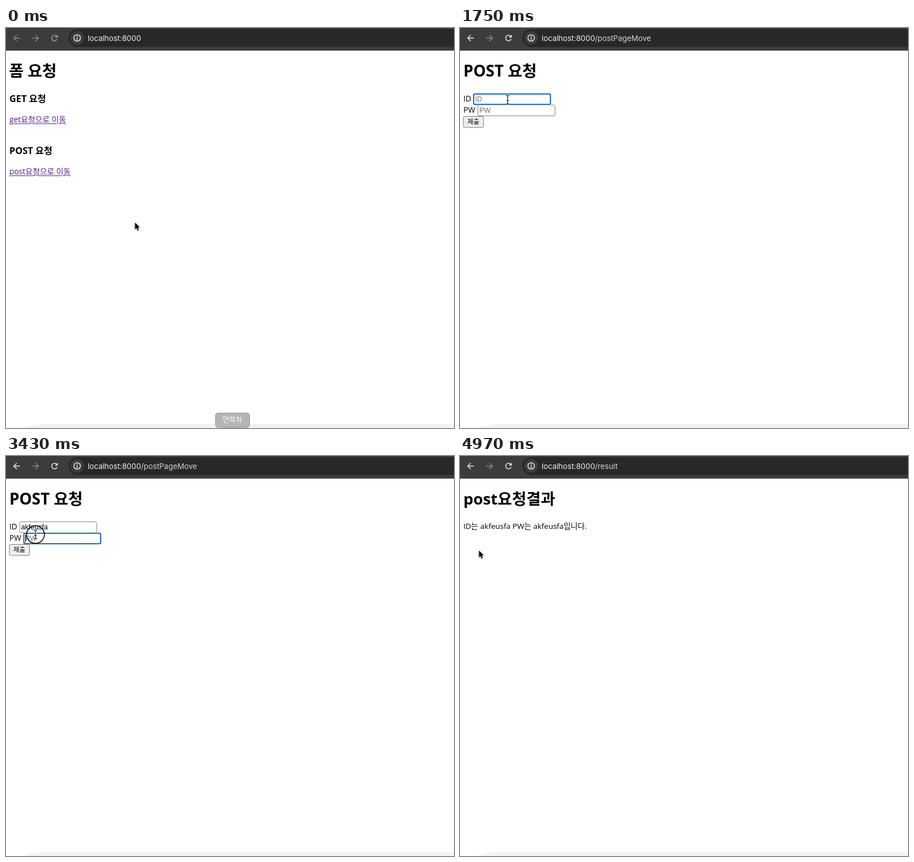
Write an HTML page with a canvas that moves like this. It is 790 px wide and 708 px high and loops after 5.32 s.

```html
<!DOCTYPE html>
<html lang="ko">
<head>
<meta charset="utf-8">
<title>폼 요청</title>
<style>
html, body { margin: 0; width: 100%; height: 100%; overflow: hidden; background: #fff; }
canvas { display: block; }
</style>
</head>
<body>
<canvas id="stage" width="790" height="708"></canvas>
<script>
const LOOP = 5320, STEP = 70;
const ctx = document.getElementById('stage').getContext('2d');
const PAGE = '"Open Sans", "Noto Sans CJK KR", "Noto Sans CJK", sans-serif';
const FIELD = '"Liberation Sans", "Noto Sans CJK KR", sans-serif';
const UI = 'Inter, "Noto Sans CJK KR", sans-serif';
const USER = 'akfeusfa';
const SAVED = [USER, 'test', 'hello', 'qwerty', '1234'];

// Pointer path: time, x, y
const PATH = [
  [0, 227, 344], [350, 227, 344], [700, 109, 270], [840, 93, 251],
  [1260, 93, 251], [1680, 84, 127], [2870, 84, 127], [3150, 52, 139],
  [4270, 52, 139], [4480, 33, 167], [LOOP, 33, 167]
];
const ID_KEYS = [2100, 2310, 2380, 2520, 2590, 2660, 2730, 2800];
const PW_KEYS = [3640, 3710, 3780, 3850, 3990, 4060, 4060, 4130];
const CLICKS = [910, 1820, 3430, 4620];

const within = (t, a, b) => t >= a && t < b;
const typed = (keys, t) => keys.filter(k => k <= t).length;

function pointerAt(t) {
  let i = 1;
  while (i < PATH.length - 1 && PATH[i][0] < t) i++;
  const [ta, xa, ya] = PATH[i - 1], [tb, xb, yb] = PATH[i];
  const p = (t - ta) / (tb - ta);
  return [xa + (xb - xa) * p, ya + (yb - ya) * p];
}

function text(s, x, y, size, color = '#000', family = PAGE, weight = 400) {
  ctx.font = `${weight} ${size}px ${family}`;
  ctx.fillStyle = color;
  ctx.fillText(s, x, y);
  return ctx.measureText(s).width;
}

function box(x, y, w, h, r, fill, stroke, line = 1) {
  ctx.beginPath();
  ctx.roundRect(x, y, w, h, r);
  if (fill) { ctx.fillStyle = fill; ctx.fill(); }
  if (stroke) { ctx.strokeStyle = stroke; ctx.lineWidth = line; ctx.stroke(); }
}

function circle(x, y, r, fill, stroke, line) {
  box(x - r, y - r, 2 * r, 2 * r, r, fill, stroke, line);
}

function lines(points, color, width) {
  ctx.beginPath();
  points.forEach(([x, y], i) => i ? ctx.lineTo(x, y) : ctx.moveTo(x, y));
  ctx.strokeStyle = color;
  ctx.lineWidth = width;
  ctx.stroke();
}

function arrowIcon(x, y, dir, color) {
  lines([[x - dir * 5.5, y], [x + dir * 5, y]], color, 1.6);
  lines([[x, y - 5.3], [x + dir * 5.3, y], [x, y + 5.3]], color, 1.6);
}

function reloadIcon(x, y, color) {
  ctx.beginPath();
  ctx.arc(x, y, 4.9, 0.35, 5.5);
  ctx.strokeStyle = color;
  ctx.lineWidth = 1.6;
  ctx.stroke();
  ctx.beginPath();
  ctx.moveTo(x + 5.8, y - 6);
  ctx.lineTo(x + 5.8, y - 0.8);
  ctx.lineTo(x + 0.6, y - 0.8);
  ctx.fillStyle = color;
  ctx.fill();
}

function toolbar(t) {
  const lit = '#e0e0e0', dim = '#858585';
  ctx.fillStyle = '#3c3c3c';
  ctx.fillRect(0, 0, 790, 40);
  box(110, 2, 720, 31.5, 15.75, '#282828');
  arrowIcon(19, 17.8, -1, t >= 1050 ? lit : dim);
  arrowIcon(52, 17.8, 1, within(t, 210, 1050) ? lit : dim);
  reloadIcon(85.5, 17.8, t >= 210 ? lit : '#999');
  circle(125.5, 17.6, 12, '#3d3d3d');
  circle(125.5, 17.6, 5.7, null, '#eee', 1.5);
  ctx.fillStyle = '#eee';
  ctx.fillRect(124.7, 16.8, 1.6, 4);
  ctx.fillRect(124.7, 14.2, 1.6, 1.6);
  const host = text('localhost:8000', 144, 22.5, 13.3, '#f0f0f0', UI);
  const path = t >= 4900 ? '/result' : t >= 980 ? '/postPageMove' : '';
  text(path, 144 + host, 22.5, 13.3, '#d2d2d2', UI);
}

function link(s, y, color) {
  ctx.font = `13.8px ${PAGE}`;
  const w = ctx.measureText(s).width;
  ctx.fillStyle = color;
  ctx.fillRect(6, y + 2, w, 1);
  ctx.strokeStyle = '#fff';
  ctx.lineWidth = 2;
  ctx.strokeText(s, 6, y);
  text(s, 6, y, 13.8, color);
}

function homePage(t) {
  const visited = '#551a8b';
  text('폼 요청', 5.5, 86, 27.8, '#000', PAGE, 700);
  text('GET 요청', 6, 131, 16.3, '#000', PAGE, 700);
  link('get요청으로 이동', 167, visited);
  text('POST 요청', 6, 223, 16.3, '#000', PAGE, 700);
  link('post요청으로 이동', 259, t >= 910 ? '#f00' : visited);
}

function field(x, y, value, hint, focused, caret) {
  if (focused) {
    box(x - 1, y - 1, 138.5, 22, 4, '#fff');
    box(x + 0.5, y + 0.7, 135.5, 18.6, 2.5, '#fff', '#1d5fa8', 2);
  } else {
    box(x + 0.5, y + 0.5, 136, 19, 2, '#fff', '#808080');
  }
  const w = value ? text(value, x + 3, y + 14, 12.5, '#000', FIELD) : 0;
  if (!value) text(hint, x + 3, y + 14, 12.5, '#757575', FIELD);
  if (caret) {
    ctx.fillStyle = '#000';
    ctx.fillRect(Math.round(x + 3 + w), y + 3, 1, 14);
  }
}

function popup(x, y, w, rows, draw) {
  ctx.save();
  ctx.shadowColor = 'rgba(0,0,0,.45)';
  ctx.shadowBlur = 3;
  ctx.shadowOffsetY = 1;
  box(x, y, w, 41 + (rows - 1) * 41.6, 3, '#1f1f1f');
  ctx.restore();
  ctx.beginPath();
  ctx.moveTo(x + 11, y + 0.5);
  ctx.lineTo(x + 19, y - 7.5);
  ctx.lineTo(x + 27, y + 0.5);
  ctx.fillStyle = '#1f1f1f';
  ctx.fill();
  for (let i = 0; i < rows; i++) draw(i, y + 25.5 + i * 41.6);
}

function passwordPopup() {
  popup(79, 164.5, 234.5, 1, (i, y) => {
    circle(94, y - 4.5, 3.2, null, '#ccc', 1.6);
    lines([[97, y - 4.5], [104, y - 4.5], [104, y - 1.5]], '#ccc', 1.6);
    text('비밀번호 관리...', 113, y, 11.8, '#eee', UI);
  });
}

function formPage(t) {
  const idFocus = within(t, 1750, 3360), pwFocus = within(t, 3360, 4620);
  const n = typed(ID_KEYS, t), dots = typed(PW_KEYS, t);
  const drawId = () => field(23.5, 116, USER.slice(0, n), 'ID', idFocus, idFocus && t >= 1890);
  const drawPw = () => field(31, 136, '•'.repeat(dots), 'PW', pwFocus, pwFocus && t >= 3430);
  text('POST 요청', 6, 86, 27.8, '#000', PAGE, 700);
  text('ID', 6, 130, 13.6);
  text('PW', 6, 149.6, 13.6);
  if (idFocus) { drawPw(); drawId(); } else { drawId(); drawPw(); }
  const down = within(t, 4620, 4690);
  box(6, 156.5, 35.5, 19.5, 2.5, down ? '#e0e0e0' : '#efefef', '#767676');
  text('제출', 13, 170, 11.5, '#000', PAGE);
  if (within(t, 1820, 2870)) {
    popup(71.7, 144.3, 145.3, t < 2170 ? SAVED.length : 1,
      (i, y) => text(SAVED[i], 83, y, 11.9, '#eee', UI));
  }
  if (within(t, 3500, 3640)) passwordPopup();
}

function resultPage() {
  text('post요청결과', 6, 86, 27.6, '#000', PAGE, 700);
  text(`ID는 ${USER} PW는 ${USER}입니다.`, 6, 129, 13.5);
}

function dockLabel(t) {
  const alpha = t < 70 ? 1 : t < 210 ? 0.6 : t < 280 ? 0.25 : 0;
  if (!alpha) return;
  ctx.globalAlpha = alpha;
  box(369.5, 681.5, 60, 25.5, 4.5, '#b5b5b5', '#929292');
  ctx.fillStyle = '#b0b0b0';
  ctx.fillRect(391, 707, 17, 1);
  text('연락처', 382, 698, 12.3, '#fff');
  ctx.globalAlpha = 1;
}

function shape(x, y, points, fill, edge, width) {
  const path = new Path2D();
  points.forEach(([px, py], i) => path[i ? 'lineTo' : 'moveTo'](x + px, y + py));
  path.closePath();
  ctx.lineJoin = 'round';
  ctx.strokeStyle = edge;
  ctx.lineWidth = width;
  ctx.stroke(path);
  ctx.fillStyle = fill;
  ctx.fill(path);
  ctx.lineJoin = 'miter';
}

function arrowPointer(x, y) {
  ctx.save();
  ctx.shadowColor = 'rgba(0,0,0,.35)';
  ctx.shadowBlur = 2;
  ctx.shadowOffsetY = 1;
  shape(x + 0.6, y + 0.6, [[0, 0], [0, 11.3], [2.5, 9], [4.5, 13.4], [6.4, 12.6],
    [4.5, 8.3], [8, 8]], '#000', '#fff', 1.4);
  ctx.restore();
}

function handPointer(x, y) {
  shape(x, y, [[-1, 0], [1, 0], [1.4, 5], [7, 6.5], [8, 8], [6.5, 14], [0, 14],
    [-5, 8], [-4, 7], [-1.5, 8.5]], '#fff', '#000', 1.4);
}

function beamPointer(x, y) {
  const strokes = [[[x, y - 7], [x, y + 7]], [[x - 2, y + 1.5], [x + 2, y + 1.5]],
    [[x - 3.2, y - 8], [x, y - 6.8], [x + 3.2, y - 8]],
    [[x - 3.2, y + 8], [x, y + 6.8], [x + 3.2, y + 8]]];
  strokes.forEach(s => lines(s, 'rgba(255,255,255,.8)', 2.6));
  strokes.forEach(s => lines(s, '#000', 1.1));
}

function pointer(t) {
  const [x, y] = pointerAt(t);
  const hidden = within(t, 2100, 2870) || within(t, 3640, 4340);
  if (!hidden) {
    const overField = within(t, 980, 4900) && y > 116 && y < 156 && x > 24;
    if (overField) beamPointer(x, y);
    else if (within(t, 840, 1120)) handPointer(x, y);
    else arrowPointer(x, y);
  }
  const click = CLICKS.find(c => within(t, c, c + 140));
  if (click === undefined) return;
  ctx.globalAlpha = t - click < 70 ? 1 : 0.55;
  circle(x, y, 15.7, null, '#000', 1.5);
  ctx.globalAlpha = 1;
}

function windowEdge() {
  ctx.beginPath();
  ctx.moveTo(30, 708);
  ctx.quadraticCurveTo(46, 701, 72, 701);
  ctx.lineTo(790, 701);
  ctx.lineTo(790, 708);
  ctx.fillStyle = '#f3f3f3';
  ctx.fill();
}

function draw(now) {
  const t = Math.floor((now % LOOP) / STEP) * STEP;
  ctx.fillStyle = '#fff';
  ctx.fillRect(0, 0, 790, 708);
  windowEdge();
  toolbar(t);
  if (t < 1050) homePage(t);
  else if (t < 4900) formPage(t);
  else resultPage();
  dockLabel(t);
  pointer(t);
}

let start;
function tick(now) {
  start ??= now;
  draw(now - start);
  requestAnimationFrame(tick);
}
requestAnimationFrame(tick);
</script>
</body>
</html>
```
